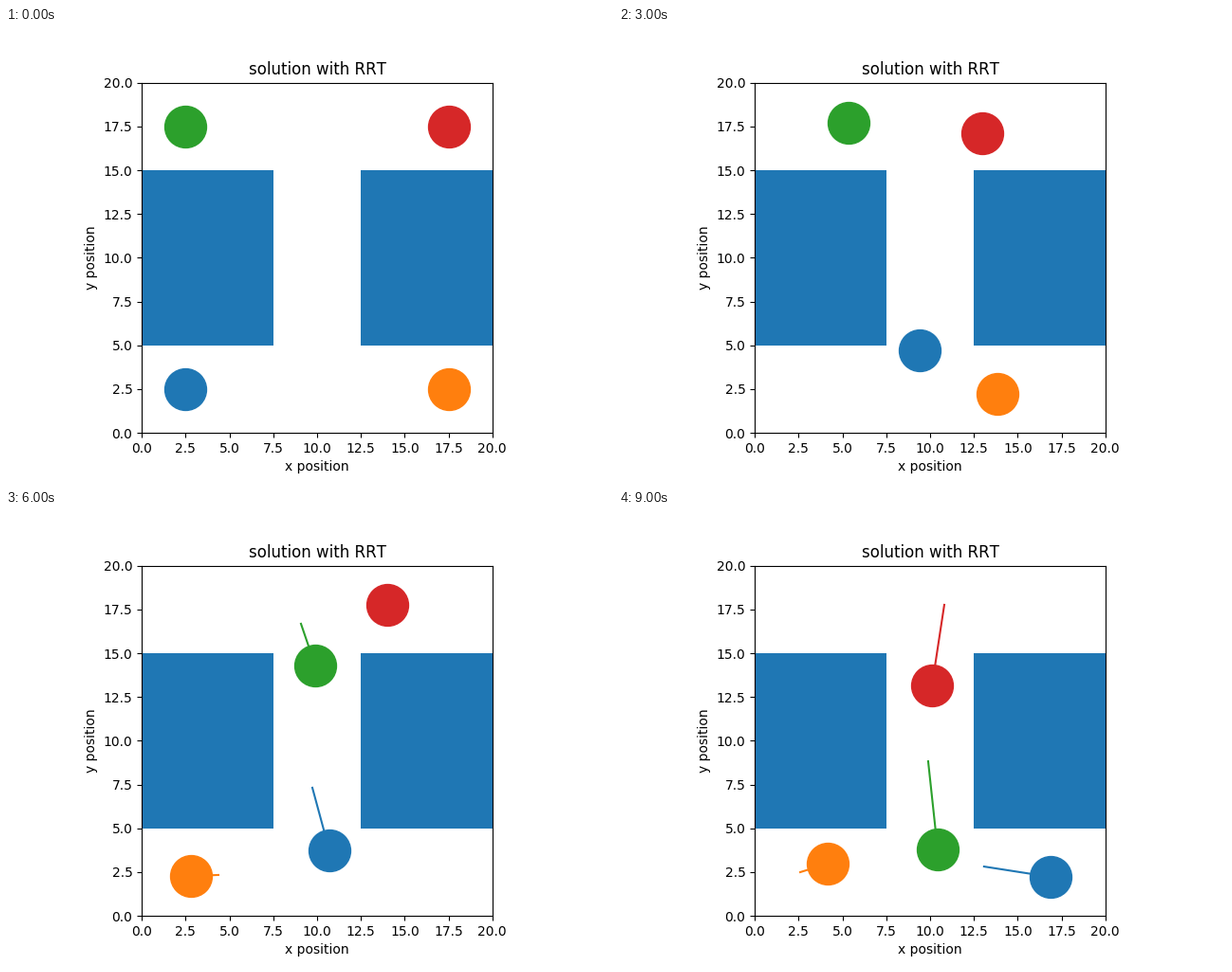
A matplotlib script for the animation above (10 s loop, 640x480 px).

```python
import numpy as np
import matplotlib.pyplot as plt
from matplotlib.animation import FuncAnimation
from matplotlib.patches import Rectangle

SIZE, STEPS = 20, 10
INSET = 2.5                     # start distance from the walls
FAR = SIZE - INSET

# Turning points {step: x + y*1j}; steps in between are interpolated
TURNS = [
    {0: INSET + INSET * 1j, 1: 7.98 + 2.9j, 2: 9.08 + 3.64j, 4: 9.78 + 5.75j,
     5: 9.73 + 7.32j, 6: 10.7 + 3.74j, 7: 11.13 + 3.18j, 8: 13.08 + 2.82j, 9: 16.87 + 2.23j},
    {0: FAR + INSET * 1j, 1: 16.24 + 2.59j, 2: 14.92 + 2.28j, 4: 12.71 + 2.18j,
     5: 4.37 + 2.34j, 6: 2.8 + 2.28j, 8: 2.59 + 2.5j, 9: 4.16 + 2.99j},
    {0: INSET + FAR * 1j, 2: 5.13 + 17.71j, 4: 5.56 + 17.65j, 5: 9.08 + 16.68j,
     6: 9.89 + 14.3j, 7: 9.97 + 13.39j, 8: 9.89 + 8.83j, 9: 10.43 + 3.8j},
    {0: FAR + FAR * 1j, 1: 14.44 + 17.11j, 2: 13.14 + 17.11j, 4: 12.76 + 17.16j,
     5: 14.92 + 17.49j, 6: 14 + 17.76j, 7: 13.55 + 17.77j, 8: 10.81 + 17.76j, 9: 10.11 + 13.16j},
]

plt.rcParams["text.kerning_factor"] = 6
fig, ax = plt.subplots(figsize=(6.4, 4.8), dpi=100)
ax.set_aspect("equal")
ticks = np.arange(0, SIZE + 1, 2.5)
ax.set(xlim=(0, SIZE), ylim=(0, SIZE), xticks=ticks, yticks=ticks,
       title="solution with RRT", xlabel="x position", ylabel="y position")

for left in (0, 12.5):
    ax.add_patch(Rectangle((left, 5), 7.5, 10, color="C0", linewidth=0))


def make_robot(index, turns):
    """Return the path of one robot with its disc and its trail."""
    path = np.interp(range(STEPS), list(turns), list(turns.values()))
    color = f"C{index}"
    body = ax.scatter([], [], s=1000, color=color)
    trail, = ax.plot([], [], color=color)
    return path, body, trail


robots = [make_robot(i, turns) for i, turns in enumerate(TURNS)]


def update(step):
    """Place each robot and the segment it has just travelled."""
    artists = []
    for path, body, trail in robots:
        segment = path[max(step - 1, 0):step + 1]
        body.set_offsets([(path[step].real, path[step].imag)])
        trail.set_data(segment.real, segment.imag)
        artists += [body, trail]
    return artists


anim = FuncAnimation(fig, update, frames=STEPS, interval=1000,
                     init_func=lambda: update(0), repeat=True, repeat_delay=0)
plt.show()
```
